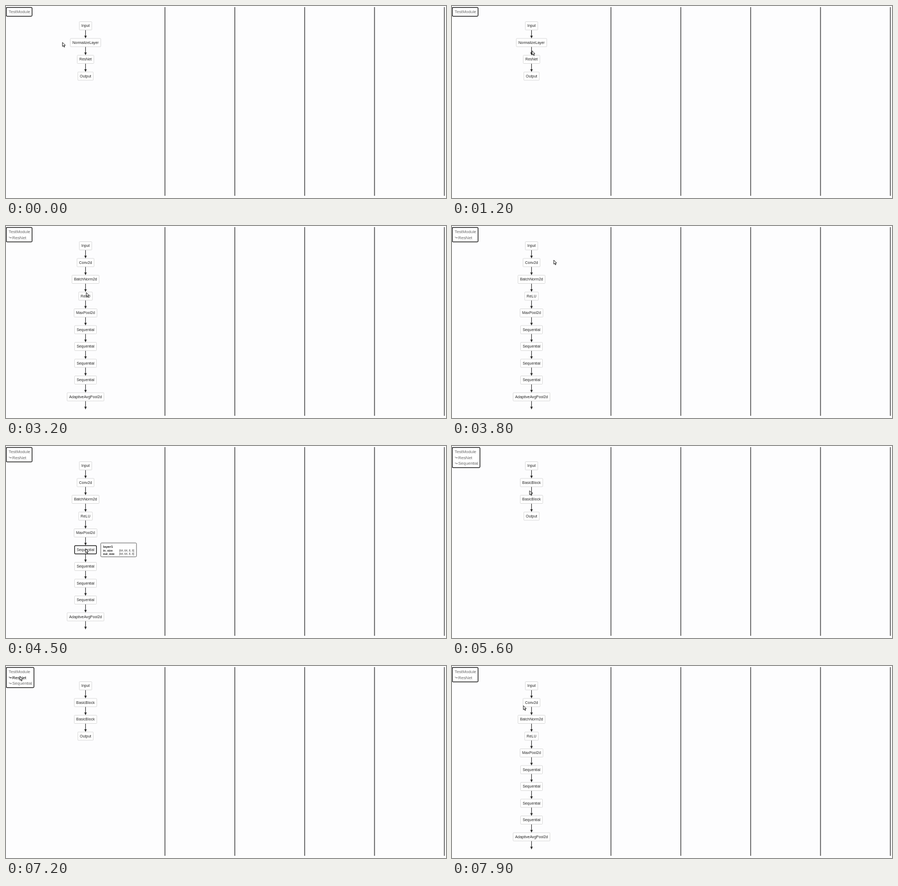
An HTML page with a canvas that plays this animation: 800 by 349 pixels, repeating every 8000 ms.

```html
<!DOCTYPE html>
<html lang="en">
<head>
<meta charset="utf-8">
<title>Module graph</title>
<style>
  html, body { margin: 0; width: 100%; height: 100%; overflow: hidden; background: #fdfdfe; }
  canvas { display: block; width: 800px; height: 349px; }
</style>
</head>
<body>
<canvas id="stage"></canvas>
<script>
const W = 800, H = 349, LOOP = 8000, STEP = 100;
const FONT = '"Liberation Sans", Arial, sans-serif';
const MID = 144.6, TOP = 36, PITCH = 30.5, NODE_H = 15;
const NODE_SIZE = 6.85, CRUMB_SIZE = 7.7, KEY_SIZE = 5.2, VALUE_SIZE = 4.9;
const CRUMB_TOP = 10.5, CRUMB_PITCH = 10.45;
const INK = '#262626';

const canvas = document.getElementById('stage');
const dpr = window.devicePixelRatio || 1;
canvas.width = W * dpr;
canvas.height = H * dpr;
const ctx = canvas.getContext('2d');

const shape = (...dims) => `[64, ${dims.join(', ')}]`;
const tip = (title, input, output, extra = {}) =>
  ({ title, rows: Object.entries({ in_size: input, out_size: output, ...extra }) });

const image = shape(3, 32, 32), wide = shape(64, 16, 16), small = shape(64, 8, 8);

// Only nodes with a tip react to the pointer.
const views = {
  root: {
    crumbs: ['TestModule'],
    nodes: ['Input', 'NormalizeLayer', 'ResNet', 'Output'],
    tips: { 1: tip('normalize', image, image), 2: tip('resnet', image, shape(10)) }
  },
  resnet: {
    crumbs: ['TestModule', 'ResNet'],
    nodes: ['Input', 'Conv2d', 'BatchNorm2d', 'ReLU', 'MaxPool2d',
            ...Array(4).fill('Sequential'), 'AdaptiveAvgPool2d'],
    tips: {
      2: tip('bn1', wide, wide, { num_features: '64', eps: '1e-05', momentum: '0.1',
                                  affine: 'True', track_running_stats: 'True' }),
      4: tip('maxpool', wide, small, { kernel_size: '3', stride: '2', padding: '1',
                                       dilation: '1', ceil_mode: 'False' }),
      5: tip('layer1', small, small)
    }
  },
  layer: {
    crumbs: ['TestModule', 'ResNet', 'Sequential'],
    nodes: ['Input', 'BasicBlock', 'BasicBlock', 'Output'],
    tips: { 1: tip('0', small, small), 2: tip('1', small, small) }
  }
};

const clicks = [[0, 'root'], [2000, 'resnet'], [4800, 'layer'], [7400, 'resnet']];

// Pointer moves: start, end, x, y of the tip
const home = [102.7, 66.2];
const moves = [
  [0, 300, 140, 67], [1000, 1400, 151.3, 96], [2600, 2800, 149, 98],
  [3000, 3200, 146, 121], [3200, 3500, 153, 303], [3500, 3800, 185, 62],
  [4100, 4400, 148, 158], [4400, 4500, 144.7, 186.7], [5200, 5600, 141, 81.3],
  [5600, 5900, 143, 67], [6100, 6400, 143, 97], [6600, 7000, 25.2, 18.7],
  [7300, 7900, 129.8, 72.2]
];

const ease = u => u * u * (3 - 2 * u);
const rowY = i => TOP + PITCH * i;
const crumbY = i => CRUMB_TOP + CRUMB_PITCH * i;
const crumbX = i => i ? 11.2 : 4.8;

function pointerAt(t) {
  let [x, y] = home;
  for (const [from, to, toX, toY] of moves) {
    if (t <= from) break;
    const u = ease(Math.min(1, (t - from) / (to - from)));
    x += (toX - x) * u;
    y += (toY - y) * u;
  }
  return { x, y };
}

function widthOf(str, size, weight = '') {
  ctx.font = `${weight} ${size}px ${FONT}`;
  return ctx.measureText(str).width;
}

function text(str, x, y, size, color, align = 'left', weight = '') {
  ctx.font = `${weight} ${size}px ${FONT}`;
  ctx.textAlign = align;
  ctx.fillStyle = color;
  ctx.fillText(str, x, y);
}

function box(x, y, w, h, r, color, line) {
  ctx.beginPath();
  ctx.roundRect(x, y, w, h, r);
  ctx.fillStyle = '#fff';
  ctx.fill();
  ctx.strokeStyle = color;
  ctx.lineWidth = line;
  ctx.stroke();
}

function polygon(points) {
  ctx.beginPath();
  points.forEach(([x, y]) => ctx.lineTo(x, y));
  ctx.closePath();
}

const nodeWidth = name => widthOf(name, NODE_SIZE) + 7.4;

function nodeUnder(view, p) {
  return view.nodes.findIndex((name, i) => view.tips[i] &&
    Math.abs(p.x - MID) < nodeWidth(name) / 2 && Math.abs(p.y - rowY(i)) < NODE_H / 2);
}

// The last crumb is the open view and stays inert.
function crumbUnder({ crumbs }, p) {
  return crumbs.slice(0, -1).findIndex((name, i) =>
    p.x < crumbX(i) + widthOf(name, CRUMB_SIZE) && Math.abs(p.y - crumbY(i)) < CRUMB_PITCH / 2);
}

function drawArrow(y) {
  const end = y + PITCH - NODE_H;
  ctx.fillStyle = INK;
  ctx.fillRect(MID - 0.5, y, 1, end - y - 4);
  polygon([[MID - 2.3, end - 5.3], [MID, end - 4.7], [MID + 2.3, end - 5.3], [MID, end]]);
  ctx.fill();
}

function drawNode(name, i, hot) {
  const w = nodeWidth(name);
  box(MID - w / 2, rowY(i) - NODE_H / 2, w, NODE_H, hot ? 1.6 : 1,
      hot ? '#111' : '#d2d2d2', hot ? 1.25 : 0.8);
  text(name, MID, rowY(i) + 2.4, NODE_SIZE, INK, 'center');
}

function drawTip({ title, rows }, left, mid) {
  const w = 17 + Math.max(...rows.map(([key, value]) =>
    widthOf(key, KEY_SIZE, 'bold') + widthOf(value, VALUE_SIZE)));
  const h = 14.2 + 5.5 * rows.length, y = mid - h / 2;
  box(left, y, w, h, 1.6, '#555', 0.9);
  text(title, left + 4.2, y + 9.2, 6.2, '#1a1a1a', 'left', 'bold');
  rows.forEach(([key, value], i) => {
    const base = y + 16.2 + 5.5 * i;
    text(key, left + 4.2, base, KEY_SIZE, '#1a1a1a', 'left', 'bold');
    text(value, left + w - 4.2, base, VALUE_SIZE, '#333', 'right');
  });
}

function drawHook(y, color) {
  ctx.strokeStyle = ctx.fillStyle = color;
  ctx.lineWidth = 0.65;
  ctx.beginPath();
  ctx.moveTo(6, y - 1.8);
  ctx.lineTo(6, y + 0.4);
  ctx.lineTo(9, y + 0.4);
  ctx.stroke();
  polygon([[8.6, y - 1], [10.4, y + 0.4], [8.6, y + 1.8]]);
  ctx.fill();
}

function drawCrumbs(crumbs, hot) {
  const right = Math.max(...crumbs.map((c, i) => crumbX(i) + widthOf(c, CRUMB_SIZE)));
  box(0.5, 2.5, right + 2.8, crumbY(crumbs.length - 1) + 5.5, 1.8, '#111', 1.25);
  crumbs.forEach((name, i) => {
    const color = i === hot ? '#000' : '#6a6a6a';
    text(name, crumbX(i), crumbY(i) + 2.6, CRUMB_SIZE, color);
    if (i) drawHook(crumbY(i), color);
  });
}

function drawPointer({ x, y }) {
  polygon([[0, 0], [0, 7.3], [1.7, 5.8], [2.9, 8.6], [4.1, 8.1], [2.9, 5.4], [5.2, 5.2]]
    .map(([dx, dy]) => [x + dx, y + dy]));
  ctx.fillStyle = '#fff';
  ctx.fill();
  ctx.strokeStyle = '#111';
  ctx.lineWidth = 0.9;
  ctx.lineJoin = 'round';
  ctx.stroke();
}

function draw(t) {
  ctx.setTransform(dpr, 0, 0, dpr, 0, 0);
  ctx.fillStyle = '#fdfdfe';
  ctx.fillRect(0, 0, W, H);
  ctx.fillStyle = INK;
  for (let i = 0; i < 5; i++) ctx.fillRect(288.4 + 127 * i, 2, 1.2, 343);

  const [opened, id] = clicks.findLast(([at]) => at <= t);
  const view = views[id], { nodes, crumbs, tips } = view;
  const p = pointerAt(t), before = pointerAt(opened);
  // A freshly opened view ignores the pointer until it moves.
  const moved = p.x !== before.x || p.y !== before.y;
  const node = moved ? nodeUnder(view, p) : -1;

  nodes.forEach((name, i) => {
    if (name !== 'Output') drawArrow(rowY(i) + NODE_H / 2);
    drawNode(name, i, i === node);
  });
  drawCrumbs(crumbs, moved ? crumbUnder(view, p) : -1);
  if (node >= 0) drawTip(tips[node], MID + nodeWidth(nodes[node]) / 2 + 7.8, rowY(node) + 0.3);
  drawPointer(p);
}

const start = performance.now();
function tick() {
  const t = Math.max(0, performance.now() - start) % LOOP;
  draw(Math.floor(t / STEP) * STEP);
  requestAnimationFrame(tick);
}
tick();
</script>
</body>
</html>
```
